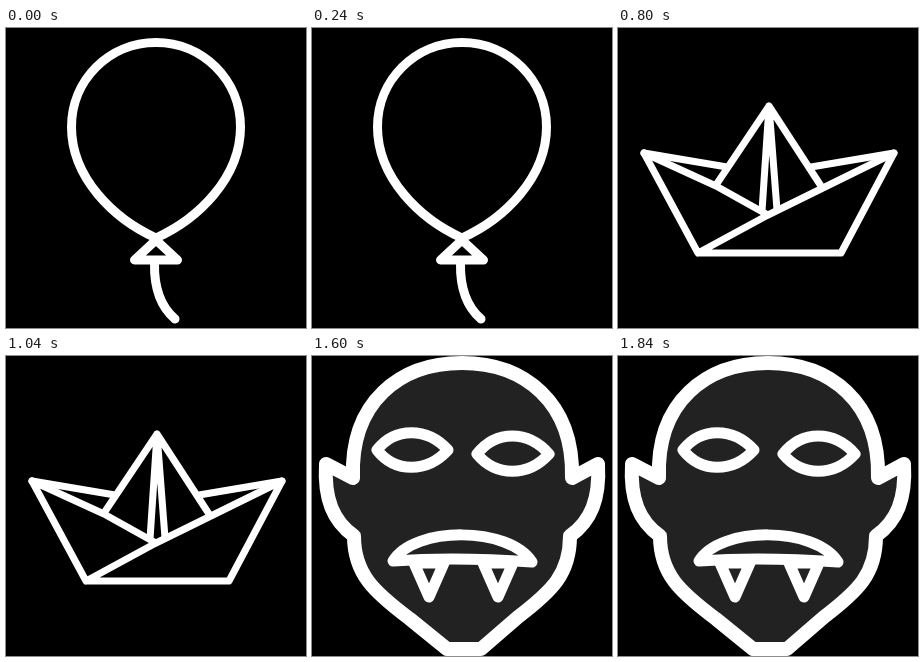
An HTML page that plays this animation: 300 by 300 pixels, repeating every 2 s.

```html
<!DOCTYPE html>
<html lang="en">
<head>
<meta charset="utf-8">
<title>Icon loop</title>
<style>
html, body { margin: 0; width: 100%; height: 100%; overflow: hidden; background: #000; }
svg { display: block; width: 100vw; height: 100vh; }
.icon {
  fill: none; stroke: #fff; stroke-linecap: round; stroke-linejoin: round;
  visibility: hidden;
  animation: show 2s step-end infinite;
  animation-delay: calc(var(--slot) * 400ms - 2s);
}
@keyframes show { 0% { visibility: visible; } 20%, 100% { visibility: hidden; } }
</style>
</head>
<body>
<svg viewBox="0 0 300 300">
  <!-- balloon -->
  <g class="icon" style="--slot:0" stroke-width="9">
    <path d="M150 210C108 191 65.500 150 65.500 99C65.500 52 103 14.500 150 14.500S234.500 52 234.500 99C234.500 150 192 191 150 210Z"/>
    <path d="M150 212L128.500 232H171.500Z"/>
    <path d="M148.500 235C148 260 155 279 169 291"/>
  </g>

  <!-- typewriter -->
  <g class="icon" style="--slot:1" stroke-width="9">
    <path d="M227 25V14H74.500V119H227V51"/>
    <path d="M91 37H193M91 58H208M91 79H138M91 101H208"/>
    <path d="M74 78H62C50 78 42 85 40 95L14 228C12.500 236 12.500 243 12.500 262C12.500 278 20 286 33 286H103"/>
    <path d="M121 286H268C281 286 288 278 288 262C288 243 288 236 286.500 228L261 95C259 85 251 78 239 78H227"/>
    <path d="M74 92C65 92 61.500 99 61.500 106S66 119 74 119M227 92C236 92 239.500 99 239.500 106S235 119 227 119"/>
    <path d="M37 102H14C7 102 3 106 3 113V122M3 143V161C3 170 8 174 15 174H23"/>
    <path d="M265 102H286C293 102 297 106 297 113V161C297 170 293 174 286 174H278"/>
    <path d="M74 153H227C234 153 239 157 241 163L257 226C259 236 254 241 246 241H55C46 241 42 235 44 227L59 163C61 157 67 153 74 153Z"/>
    <path d="M58 173H243M53 194H248M48 216H253"/>
    <path d="M76 153V173M95 153V173M121.500 153V173M150 153V173M178.500 153V173M205 153V173M224 153V173"/>
    <path d="M79 173V194M107.500 173V194M136 173V194M164 173V194M192.500 173V194M221 173V194"/>
    <path d="M70 194V216M93 194V216M121.500 194V216M150 194V216M178.500 194V216M207 194V216M230 194V216"/>
    <path d="M76 216V241M102 216V241M167 216V241M196 216V241M223 216V241"/>
  </g>

  <!-- paper boat -->
  <g class="icon" style="--slot:2" stroke-width="7">
    <path d="M26 125L80 225H223L276 125L150 187L80 225M26 125L98 158L150 187"/>
    <path d="M98 157L151 78L203 158M144 183L151 78L159 182"/>
    <path d="M26 125L109 139M276 125L193 139"/>
  </g>

  <!-- dog -->
  <g class="icon" style="--slot:3" stroke-width="8.500">
    <g id="half">
      <path d="M76 30C92 12 118 4 151 4"/>
      <path d="M76 30C65 32 60 42 58 53C55 76 21 84 20 114C20 146 42 162 57 170C63 174 64 178 66 184C74 177 80 165 82 150"/>
      <path d="M76 90V114C76 145 86 164 95 178"/>
      <path d="M90 74C90 56 100 43 112 42C117 42 120 44 122 47"/>
      <path d="M117 10C132 24 139 48 129 80"/>
      <path d="M151 80C121 80 99 102 99 130"/>
      <path d="M99 174C99 188 103 198 110 203C118 204 124 197 129 190L151 161"/>
      <path d="M126 192C128 202 138 206 151 206"/>
      <path d="M142 122C146 128 145 138 138 138C130 138 127 130 129 122C132 110 140 104 151 104M138 138C144 142 148 142 151 142V161"/>
      <path d="M66 184L38 284C36 290 36 294 41 294H151"/>
      <path d="M110 203C101 216 86 219 71 215C74 232 78 240 85 245C89 251 94 253 99 253"/>
    </g>
    <use href="#half" transform="matrix(-1 0 0 1 302 0)"/>
    <path d="M76 30V72M226 30V114M99 130V174M203 130V137M203 162V174"/>
    <path d="M85 245C88 268 104 280 122 280M141 272C148 269 151 263 151 254C153 271 167 280 182 280C200 280 214 268 217 245"/>
  </g>

  <!-- vampire -->
  <g class="icon" style="--slot:4" stroke-width="14">
    <path fill="#222" d="M41 122C38 46 88 7 150 7S262 46 260 122L286 108C288 143 279 165 258 180C258 218 240 235 206 261L169 293H135L98 263C62 236 42 218 42 180C21 165 12 143 14 108Z"/>
    <g fill="#222" stroke-width="11">
      <path d="M65 94C83 71 115 71 136 94C115 117 83 117 65 94Z"/>
      <path d="M165 98C184 74 216 74 237 98C216 121 184 121 165 98Z"/>
      <path d="M81 205C102 170 197 170 220 206C177 203 125 202 81 205Z"/>
      <path d="M102 207H132L117 241Z"/>
      <path d="M171 207H201L186 241Z"/>
    </g>
  </g>
</svg>
</body>
</html>
```
